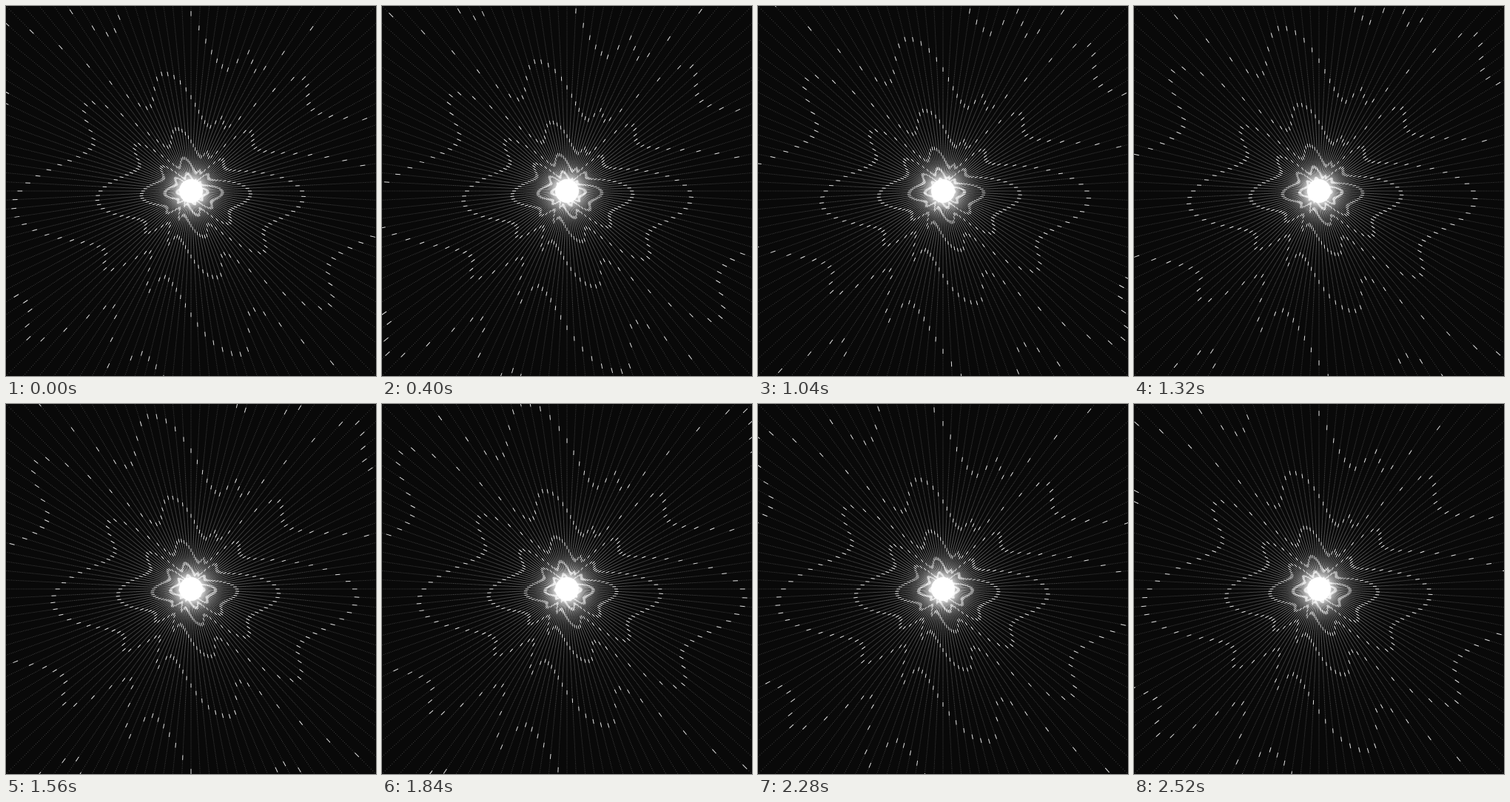
An HTML page with a canvas that plays this animation: 500 px wide and 500 px high, repeating every 2.56 s.

```html
<!DOCTYPE html>
<html lang="en">
<head>
<meta charset="utf-8">
<title>Starburst</title>
<style>
  html, body { margin: 0; height: 100%; overflow: hidden; background: #090909; }
  canvas { display: block; }
</style>
</head>
<body>
<canvas id="stage" width="500" height="500"></canvas>
<script>
const SIZE = 500, CENTER = SIZE / 2, RAYS = 128;
const GROWTH = 1.01, STEPS = 64, STEP_MS = 40;
const INNER = 240, OUTER = 592; // radii as powers of GROWTH

// Crests and troughs of the wave around the circle: [ray, growth steps].
// The wave closes on itself because steps repeat every STEPS.
const wave = [
  [10, 26], [14, 40], [22.5, -54], [25.5, -29], [38.5, -94], [40, -75],
  [44, -114], [49, -68], [51.5, -78], [62, -25], [73, -75], [78, -52],
  [86.5, -154], [91, -128], [102, -187], [104, -170], [106, -180],
  [112, -100], [115.5, -109], [129, -7], [138, -38]
];

const ctx = document.getElementById('stage').getContext('2d');
const radius = step => GROWTH ** step;
const mod = (a, n) => ((a % n) + n) % n;

function phase(ray) {
  const x = ray < wave[0][0] ? ray + RAYS : ray;
  const k = wave.findIndex(([end]) => end > x);
  const [x0, y0] = wave[k - 1], [x1, y1] = wave[k];
  return y0 + (y1 - y0) * (1 - Math.cos(Math.PI * (x - x0) / (x1 - x0))) / 2;
}

function eachRay(c, draw) {
  for (let ray = 0; ray < RAYS; ray++) {
    c.save();
    c.translate(CENTER, CENTER);
    c.rotate(ray / RAYS * 2 * Math.PI);
    draw(ray);
    c.restore();
  }
}

// The dots sit on a fixed geometric grid, so they are painted only once.
function paintDots() {
  const canvas = document.createElement('canvas');
  canvas.width = canvas.height = SIZE;
  const c = canvas.getContext('2d');
  c.fillStyle = '#090909';
  c.fillRect(0, 0, SIZE, SIZE);
  c.fillStyle = 'rgba(255,255,255,.22)';
  eachRay(c, () => {
    for (let n = INNER; n < OUTER; n++) c.fillRect(radius(n) - .5, -.5, 1, 1);
  });
  c.fillStyle = '#fff';
  c.beginPath();
  c.arc(CENTER, CENTER, 16, 0, 2 * Math.PI);
  c.fill();
  return canvas;
}

const dots = paintDots();

function render(now) {
  const step = Math.floor(now / STEP_MS) % STEPS;
  ctx.drawImage(dots, 0, 0);
  ctx.fillStyle = 'rgba(255,255,255,.85)';
  eachRay(ctx, ray => {
    const first = 192 + mod(phase(ray) + step, STEPS);
    for (let n = first; n < OUTER + 8; n += STEPS) {
      const r = radius(n), length = 4 + r * .012;
      ctx.fillRect(r - length / 2, -.5, length, 1);
    }
  });
  requestAnimationFrame(render);
}
requestAnimationFrame(render);
</script>
</body>
</html>
```
